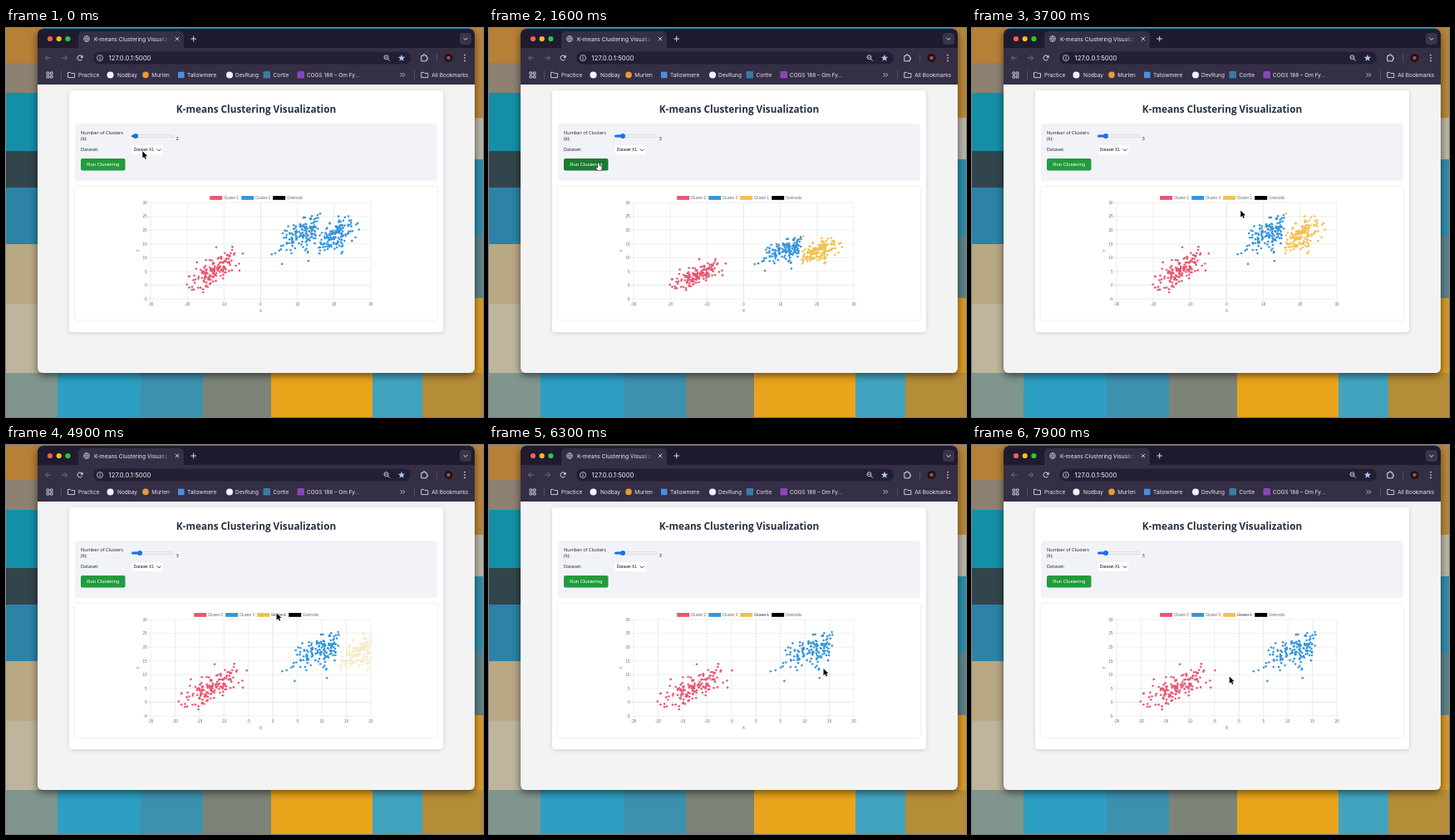
Recreate the animation shown at these times as an HTML page. Size 574 px wide and 468 px high, loop 8 s.

```html
<!DOCTYPE html>
<html lang="en">
<head>
<meta charset="utf-8">
<title>K-means Clustering Visualization</title>
<style>
html, body { margin: 0; width: 574px; height: 468px; overflow: hidden; }
svg { display: block; }
text { white-space: pre; }
.window { filter: drop-shadow(0 3px 5px rgba(0,0,0,.55)); }
.card { filter: drop-shadow(0 1px 2.5px rgba(0,0,0,.14)); }
.panel { filter: drop-shadow(0 .7px 1.5px rgba(0,0,0,.13)); }
</style>
</head>
<body>
<svg width="574" height="468" viewBox="0 0 574 468">
  <defs>
    <linearGradient id="fade">
      <stop offset="0" stop-color="#352f46" stop-opacity="0"/>
      <stop offset=".75" stop-color="#352f46"/>
    </linearGradient>
    <clipPath id="frame"><rect x="38" y="1" width="526" height="414" rx="6"/></clipPath>
    <clipPath id="area"><rect x="173" y="209" width="267" height="118"/></clipPath>
  </defs>
  <g id="still"></g>
  <g id="live"></g>
</svg>
<script>
const LOOP = 8000, STEP = 100, RUN = 1350, HIDE = 4665;
const UI = 'Inter, sans-serif', PAGE = 'Open Sans, sans-serif', ARIAL = 'Liberation Sans, sans-serif';
const RED = '#ea5570', BLUE = '#3595dc', YELLOW = '#f3c04f';

// ---- helpers: each returns markup ----
const lerp = (a, b, p) => a + (b - a) * p;
const outQuart = t => 1 - (1 - Math.min(1, Math.max(0, t))) ** 4;
const each = (list, fn) => list.map(fn).join('');

const rect = (x, y, w, h, fill, r = 0, cls = '') =>
  `<rect x="${x}" y="${y}" width="${w}" height="${h}" rx="${r}" fill="${fill}" class="${cls}"/>`;
const dot = (x, y, r, fill) => `<circle cx="${x}" cy="${y}" r="${r}" fill="${fill}"/>`;
const ring = (x, y, r, color, w = 1) =>
  `<circle cx="${x}" cy="${y}" r="${r}" fill="none" stroke="${color}" stroke-width="${w}"/>`;
const stroke = (d, color, w = 1) => `<path d="${d}" fill="none" stroke="${color}" stroke-width="${w}"/>`;
const fill = (d, color) => `<path d="${d}" fill="${color}"/>`;
const text = (s, x, y, size, color, font = UI, anchor = 'start', extra = '') =>
  `<text x="${x}" y="${y + size * .36}" font-size="${size}" fill="${color}" font-family="${font}" text-anchor="${anchor}" ${extra}>${s}</text>`;

// ---- data ----
let seed = 188;
function rnd() {
  seed = seed + 0x6D2B79F5 | 0;
  let t = Math.imul(seed ^ seed >>> 15, 1 | seed);
  t = t + Math.imul(t ^ t >>> 7, 61 | t) ^ t;
  return ((t ^ t >>> 14) >>> 0) / 4294967296;
}
const gauss = () => Math.sqrt(-2 * Math.log(1 - rnd())) * Math.cos(2 * Math.PI * rnd());

function cluster(n, mx, my, sx, sy, corr, [x0, x1, y0, y1], edge) {
  const pts = [...edge];
  while (pts.length < n) {
    const a = gauss(), b = gauss();
    const x = mx + sx * a, y = my + sy * (corr * a + Math.sqrt(1 - corr * corr) * b);
    if (x > x0 && x < x1 && y > y0 && y < y1) pts.push([x, y]);
  }
  return pts;
}
const left = cluster(150, -13, 4.9, 3.1, 3.1, .62, [-20, -5.5, -2, 12.5],
  [[-17.4, 8.3], [-12.1, 13.8], [-7.7, 13.9], [-7.8, 12.8], [-4.9, 11.5], [-15.7, -2.6], [-20.1, .3]]);
const mid = cluster(152, 12.2, 18.9, 3.4, 3.4, .55, [4, 15.7, 11, 25.5],
  [[3, 11.2], [4, 11.6], [5.8, 7.7], [5.5, 13], [13, 8.8], [12.8, 11.8]]);
const right = cluster(150, 20, 17.8, 2.7, 3, .58, [15.8, 26.5, 11, 25],
  [[16.2, 26], [23.9, 25], [26.8, 20.2], [26, 22], [22, 11.5], [16, 11.5]]);

// ---- wallpaper: plain colour blocks ----
function wallpaper() {
  const strip = (x, w, y, list) => each(list, ([h, color]) => {
    const s = rect(x, y, w, h + .5, color);
    y += h;
    return s;
  });
  const row = (x, list) => each(list, ([w, color]) => {
    const s = rect(x, 415, w, 53, color);
    x += w;
    return s;
  });
  return rect(0, 0, 574, 468, '#2b8fb0') +
    strip(0, 45, 0, [[42, '#b78036'], [36, '#8d8271'], [70, '#148fa8'], [44, '#33454c'],
      [68, '#2c83a5'], [72, '#b9a884'], [83, '#bdb59c']]) +
    strip(558, 16, 0, [[108, '#b98639'], [50, '#b9b4a4'], [92, '#2f8ca8'], [75, '#5a8288'], [90, '#d89a24']]) +
    row(0, [[62, '#81958f'], [100, '#2d9fc2'], [75, '#3c91af'], [82, '#7c8478'],
      [122, '#eaa41b'], [60, '#41a4bf'], [73, '#b58c38']]);
}

// ---- browser ----
const ink = '#dcd8e6', dim = '#746d86', line = '#5b546d';

const folder = (x, y) =>
  stroke(`M${x} ${y - 3}h3l1.2 1.2h3.8v5h-8z`, ink, .9);

function tabs() {
  return rect(38, 1, 526, 24, '#1f1b2e') + rect(38, 24, 526, 44, '#352f46') +
    rect(87, 4, 127, 24, '#352f46', 5) +
    each(['#f45f57', '#f8bc2f', '#2ac840'], (f, i) => dot(53 + i * 10.7, 13, 3.1, f)) +
    ring(97, 13, 3.4, '#cfcbd9', .8) +
    stroke('M93.8 13h6.4M97 9.6q-3 3.4 0 6.8q3-3.4 0-6.8', '#cfcbd9', .7) +
    text('K-means Clustering Visualiza', 106, 13.2, 6.7, '#ece9f3') +
    rect(182, 7, 19, 12, 'url(#fade)') +
    stroke('M203.8 10.8l4.4 4.4m0-4.4l-4.4 4.4', ink, .9) +
    stroke('M222.4 13h6.6m-3.3-3.3v6.6', ink) +
    rect(546, 6, 14, 14, '#3a344b', 4) + stroke('M550.6 12l2.4 2.4 2.4-2.4', ink);
}
function toolbar() {
  const star = each([...Array(10).keys()], i => {
    const a = i * Math.PI / 5 - Math.PI / 2, r = i % 2 ? 1.9 : 4.4;
    return `${i ? 'L' : 'M'}${476 + r * Math.cos(a)} ${36.2 + r * Math.sin(a)}`;
  });
  return stroke('M54 36h-6.5m3-3l-3 3 3 3M67 36h6.5m-3-3l3 3-3 3', dim) +
    stroke('M91.6 37.4a3 3 0 1 1-.4-3.5', ink) + fill('M92.6 32.4v3.4h-3.4z', ink) +
    rect(105, 28.5, 382, 15, '#231f33', 7.5) +
    ring(113, 36, 3.5, ink, .8) + stroke('M113 35.5v2.5', ink, .9) + dot(113, 34.2, .55, ink) +
    text('127.0.0.1:5000', 123.5, 36.1, 7.75, '#f1eff6') +
    ring(457.5, 35.2, 2.5, ink, .9) + stroke('M459.3 37l2.5 2.5M456.3 35.2h2.4', ink) +
    fill(star + 'z', '#a9c7fa') +
    stroke('M499.8 33.4h2.2v-1.4h2.4v1.4h1.8v2.2h1.2v2h-1.2v2.2h-6.4z', ink) +
    stroke('M518.5 31v10', line, .8) +
    dot(532.5, 36, 5, '#17151c') + dot(532.5, 36, 2.3, '#b8433f') +
    each([32.6, 36, 39.4], y => dot(552, y, .85, ink));
}
function bookmarks() {
  const label = (s, x) => text(s, x, 56.5, 6.5, '#e9e6f0');
  const box = (x, y) => stroke(`M${x} ${y}h2.7v2.7h-2.7z`, ink, .9);
  return box(49, 53) + box(53.3, 53) + box(49, 57.3) + box(53.3, 57.3) +
    stroke('M66.5 51v11M491.5 51v11', line, .8) +
    folder(74.5, 56.4) + label('Practice', 87) +
    dot(125.5, 56.4, 4, '#f2f1f5') + label('Nodbay', 134) +
    dot(168, 56.4, 3.8, '#e59a3c') + label('Murlen', 175.3) +
    rect(207, 52.7, 7.5, 7.5, '#4a8fdd') + label('Tallowmere', 218) +
    dot(269, 56.4, 4, '#f2f1f5') + label('DevRung', 276) +
    rect(309.5, 52, 8.5, 8.5, '#3d7aa6', 1) + label('Cortle', 321.5) +
    rect(350.5, 52, 8.5, 8.5, '#8c45b8', 1) + label('COGS 188 – Om Fy...', 362) +
    stroke('M474.6 54.2l2.2 2.2-2.2 2.2m3-4.4l2.2 2.2-2.2 2.2', ink, .9) +
    folder(499.8, 56.4) + label('All Bookmarks', 512.3);
}

// ---- page ----
function page() {
  const dark = '#1d1d20';
  return rect(76, 75, 450, 291, '#fff', 4, 'card') +
    text('K-means Clustering Visualization', 301, 97.8, 11.75, '#253242', PAGE, 'middle', 'font-weight="700"') +
    rect(83, 115, 436, 69, '#f2f3f8', 3) +
    text('Number of Clusters', 90, 126.4, 5.6, dark, PAGE) +
    text('(k):', 90, 133, 5.6, dark, PAGE) +
    text('Dataset:', 90, 146.1, 5.6, dark, PAGE) +
    rect(151.5, 141.3, 37, 10.6, '#fff', 2) +
    text('Dataset X1', 153.8, 146.7, 4.9, '#111', ARIAL) +
    stroke('M181.8 145.6l2.2 2.2 2.2-2.2', '#222', .9) +
    rect(83, 191, 436, 160.5, '#fff', 3, 'panel');
}
function controls(t) {
  const k = t < 600 ? 2 : 3, thumb = k === 2 ? 156 : 161;
  return rect(151, 128.5, 51.5, 3, '#c9c9cc', 1.5) + rect(151.5, 129, 50.5, 2, '#f0f0f0', 1) +
    rect(151, 128.5, thumb - 151, 3, '#1a73e8', 1.5) + dot(thumb, 130, 3, '#1a73e8') +
    text(k, 204.6, 133, 5.8, '#1d1d20', PAGE) +
    rect(90, 157, 53.5, 14.5, overButton(t) ? '#1b7c32' : '#229b3d', 2) +
    text('Run Clustering', 116.7, 164.2, 5.9, '#fff', ARIAL, 'middle');
}

// ---- chart ----
const L = 174, R = 439, T = 210, B = 326;
const WIDE = [-30, 30], TIGHT = [-25, 20];
const px = (v, [lo, hi]) => L + (v - lo) / (hi - lo) * (R - L);
const py = v => B - (v + 5) / 35 * (B - T);
const small = (s, x, y, anchor, extra) => text(s, x, y, 4.5, '#666', ARIAL, anchor, extra);

function legend(items) {
  const x0 = 302.2 - items.length * 19;
  return each(items, ([name, color, off], i) => {
    const x = x0 + i * 38;
    return rect(x, 202, 15, 4.8, color) +
      small(name, x + 16.8, 204.4, 'start', off ? 'text-decoration="line-through"' : '');
  });
}
function axes([lo, hi], step) {
  let s = '';
  const grid = (v, d) => stroke(d, v ? '#e6e6e8' : '#dcdcdf', .7);
  for (let v = lo; v <= hi; v += step) {
    const x = px(v, [lo, hi]);
    s += grid(v, `M${x} ${T}V${B + 4}`) + small(v, x, 332.3, 'middle');
  }
  for (let v = -5; v <= 30; v += 5) {
    s += grid(v, `M${L - 4} ${py(v)}H${R}`) + small(v, 169.5, py(v) + .2, 'end');
  }
  return s + small('X', 306.5, 340.2, 'middle') +
    `<g transform="translate(159.3 268) rotate(-90)">${small('Y', 0, 0, 'middle')}</g>`;
}
function chart(t) {
  const ran = t >= RUN, off = t >= HIDE;
  const rise = ran ? outQuart((t - RUN) / 1000) : 1;
  const slide = outQuart((t - HIDE) / 1000);
  const at = ([x, y]) => [lerp(px(x, WIDE), px(x, TIGHT), slide), py(y * rise)];
  const plot = (pts, color, alpha = 1) =>
    `<g opacity="${alpha}">${each(pts, p => dot(...at(p), 1.3, color))}</g>`;
  const [mx, my] = at([20, 18]);
  const end = ['Centroids', '#000'];
  const items = ran
    ? [['Cluster 2', RED], ['Cluster 3', BLUE], ['Cluster 1', YELLOW, off], end]
    : [['Cluster 1', RED], ['Cluster 2', BLUE], end];
  return legend(items) + axes(off ? TIGHT : WIDE, off ? 5 : 10) +
    '<g clip-path="url(#area)">' +
    stroke(`M${mx - 4} ${my - 4}l8 8m0-8l-8 8`, '#dff0f6', .9) +
    plot(left, RED) + plot(mid, BLUE) + plot(right, ran ? YELLOW : BLUE, 1 - slide) + '</g>';
}

// ---- pointer: time, x, y ----
const track = [
  [0, 164.3, 148.3], [300, 156, 129], [500, 156, 129], [700, 161, 129.5], [900, 160, 134], [1200, 132, 162.5],
  [1700, 132, 162.5], [2100, 174.5, 178.3], [2300, 180, 184], [2700, 236, 204], [3200, 288, 213], [3600, 322.5, 220],
  [3700, 323.3, 219.4], [3900, 323.3, 219], [4500, 325.6, 202.2], [5500, 325.6, 202.2], [6100, 402.5, 269], [6300, 402.5, 269],
  [6600, 385, 258], [7100, 306, 240], [7300, 344, 266], [7400, 344, 266], [7700, 311, 278], [7900, 309.8, 278.6]
];
const ARROW = 'M0 0v8.2l1.9-1.7 1.3 2.9 1.4-.6-1.3-2.8 2.5-.2z';
const HAND = 'M-1 0h1.4l.2 3.2 3 .8.2 3-1 2h-4l-2.2-3.4.8-.6 1.6 1z';
const overButton = t => t >= 1200 && t < 1800;

function pointer(t) {
  const i = Math.max(1, track.findIndex(p => p[0] >= t));
  const [t0, x0, y0] = track[i - 1], [t1, x1, y1] = track[i];
  let p = (t - t0) / (t1 - t0);
  p = p * p * (3 - 2 * p);
  const hand = overButton(t);
  const [body, edge] = hand ? ['#fff', '#111'] : ['#000', '#fff'];
  return `<path transform="translate(${lerp(x0, x1, p)} ${lerp(y0, y1, p)})" d="${hand ? HAND : ARROW}"
    fill="${body}" stroke="${edge}" stroke-width="1.1" stroke-linejoin="round" paint-order="stroke"/>`;
}

const still = document.getElementById('still'), live = document.getElementById('live');
still.innerHTML = wallpaper() + rect(38, 1, 526, 414, '#f3f3f4', 6, 'window') +
  `<g clip-path="url(#frame)">${tabs()}${toolbar()}${bookmarks()}</g>` + page();

let last = -1;
function frame(now) {
  const t = Math.floor(now % LOOP / STEP) * STEP;
  if (t !== last) {
    last = t;
    live.innerHTML = controls(t) + chart(t) + pointer(t);
  }
  requestAnimationFrame(frame);
}
frame(0);
</script>
</body>
</html>
```
